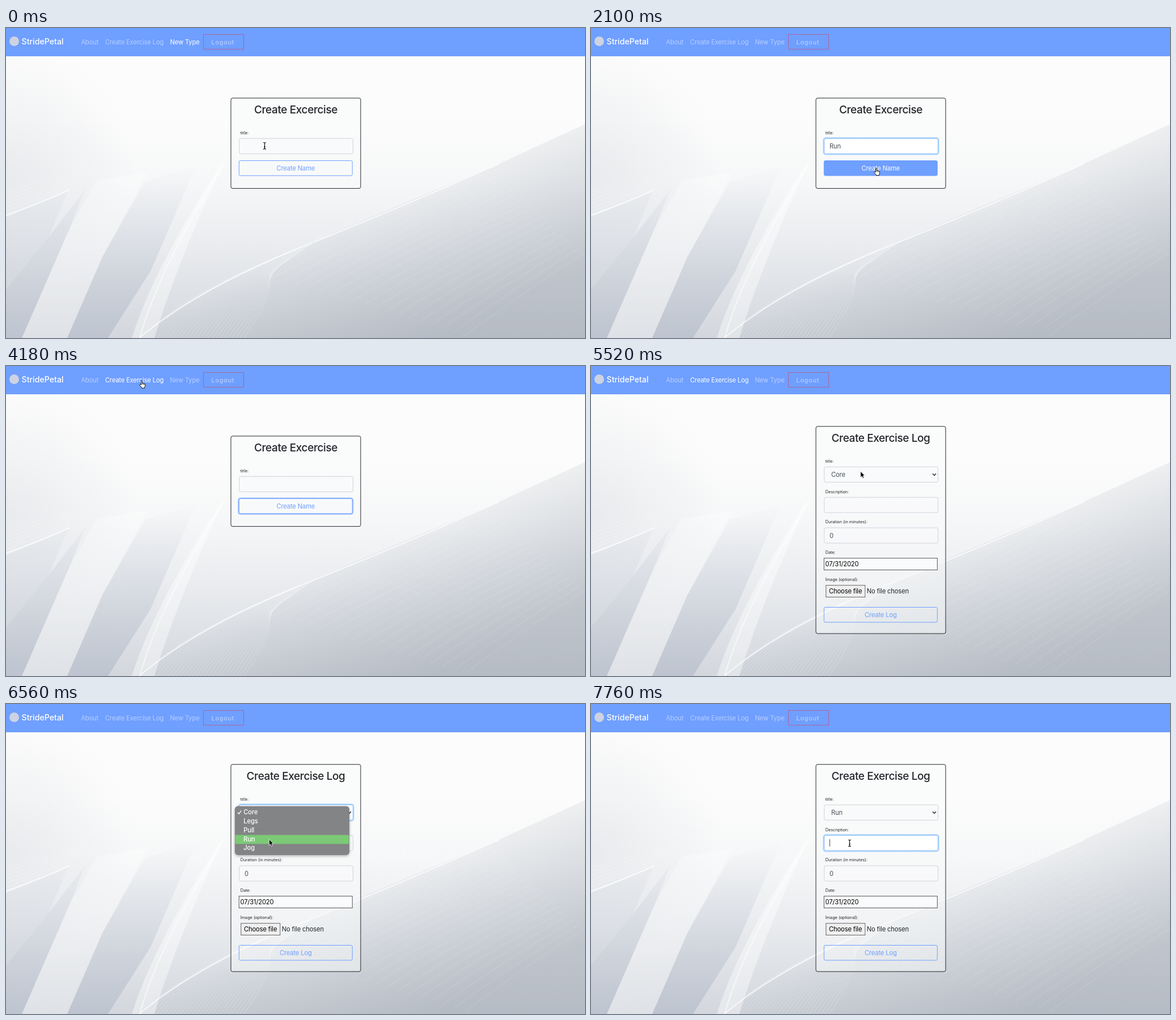
These frames come from a looping animation (1022 px wide and 548 px high, 8000 ms). An HTML page:

```html
<!DOCTYPE html>
<html lang="en">
<head>
<meta charset="utf-8">
<title>Exercise log</title>
<style>
html, body { margin: 0; width: 100%; height: 100%; overflow: hidden; background: #fcfcfc; }
svg { display: block; width: 1022px; height: 548px; }
text { font: 400 11.2px Inter, Roboto, sans-serif; letter-spacing: -.15px; white-space: pre; }
text.title { font-size: 19px; font-weight: 500; letter-spacing: -.4px; }
text.label { font-size: 7.3px; letter-spacing: 0; }
text.brand { font-size: 14.2px; font-weight: 500; letter-spacing: 0; }
text.logout { font-size: 10.8px; font-weight: 500; letter-spacing: .8px; }
text.item { font-weight: 500; }
</style>
</head>
<body>
<svg viewBox="0 0 1022 548">
  <defs>
    <linearGradient id="sky" x2="0" y2="1">
      <stop offset=".3" stop-color="#fcfcfc"/>
      <stop offset=".5" stop-color="#f6f7f8"/>
      <stop offset=".7" stop-color="#eaecef"/>
      <stop offset="1" stop-color="#d3d7dd"/>
    </linearGradient>
    <linearGradient id="shade" gradientUnits="userSpaceOnUse" x1="620" y1="270" x2="760" y2="548">
      <stop offset="0" stop-color="#8c96a2" stop-opacity="0"/>
      <stop offset="1" stop-color="#8c96a2" stop-opacity=".42"/>
    </linearGradient>
    <linearGradient id="band" gradientUnits="userSpaceOnUse" x1="0" y1="240" x2="0" y2="548">
      <stop offset="0" stop-color="#a9b2c2" stop-opacity="0"/>
      <stop offset="1" stop-color="#a9b2c2" stop-opacity=".5"/>
    </linearGradient>
    <radialGradient id="haze" gradientUnits="userSpaceOnUse" cx="0" cy="260" r="230">
      <stop offset="0" stop-color="#dfe2e6" stop-opacity=".6"/>
      <stop offset="1" stop-color="#dfe2e6" stop-opacity="0"/>
    </radialGradient>
    <filter id="shadow" x="-10%" y="-10%" width="120%" height="130%">
      <feDropShadow dx="0" dy="2" stdDeviation="2.5" flood-opacity=".3"/>
    </filter>
  </defs>
  <g id="backdrop"></g>
  <g id="scene"></g>
</svg>
<script>
const BLUE = '#6f9fff', INK = '#212529', GREY = '#495057';
const LOOP = 8000;

const rect = (x, y, w, h, fill, stroke = 'none', extra = '') =>
  `<rect x="${x}" y="${y}" width="${w}" height="${h}" fill="${fill}" stroke="${stroke}" ${extra}/>`;
const text = (x, y, content, fill = INK, cls = '', anchor = 'start') =>
  `<text x="${x}" y="${y}" fill="${fill}" class="${cls}" text-anchor="${anchor}">${content}</text>`;
const path = (d, stroke, width, extra = '') =>
  `<path d="${d}" fill="none" stroke="${stroke}" stroke-width="${width}" ${extra}/>`;
const repeat = (count, make) => Array.from({ length: count }, (_, i) => make(i)).join('');

function backdrop() {
  const white = (d, width, opacity) => path(d, '#fff', width, `opacity="${opacity}"`);
  return rect(0, 0, 1022, 548, 'url(#sky)') +
    rect(0, 50, 240, 450, 'url(#haze)') +
    '<path d="M230 548Q330 470 520 388T870 240L1022 170V548Z" fill="url(#shade)"/>' +
    '<path d="M0 462L75 370 140 285 112 355 28 548H0Z" fill="url(#band)"/>' +
    '<path d="M0 335L110 287 75 370 0 462Z" fill="url(#band)" opacity=".7"/>' +
    '<path d="M108 548L170 405 245 272 335 245 255 430 180 548Z" fill="url(#band)"/>' +
    '<path d="M28 548L112 355 160 270 250 255 170 405 108 548Z" fill="#fff" opacity=".25"/>' +
    '<path d="M222 548Q262 420 390 225Q300 420 262 548Z" fill="#fff" opacity=".4"/>' +
    white('M0 331Q60 310 112 286', 2, .7) +
    white('M236 548Q270 425 385 240', 2, .6) +
    white('M235 548Q340 460 520 388T870 240', 2.2, .7) +
    repeat(7, i => white(`M0 ${331 - i * 7}L${112 + i * 5} ${286 - i * 6}`, .6, .4)) +
    repeat(26, i => white(`M${245 + i * 7} 548Q${300 + i * 7} 470 ${540 - i * 3} ${382 + i * 2}`, .7, .35)) +
    repeat(20, i => white(`M${430 + i * 20} ${430 + i * 6}Q${560 + i * 18} ${360 + i * 6} ${850 + i * 9} ${245 + i * 8}`, .7, .22));
}

function navbar({ link }) {
  const tab = (x, name) => text(x, 28.5, name, link === name ? '#fff' : 'rgba(255,255,255,.5)');
  return rect(0, 0, 1022, 50, BLUE) +
    '<circle cx="14.5" cy="23.5" r="8.5" fill="#cdd3e2"/>' +
    text(27.5, 28.5, 'StridePetal', '#fff', 'brand') +
    tab(132.5, 'About') + tab(175, 'Create Exercise Log') + tab(289.5, 'New Type') +
    rect(348.5, 11.5, 71, 26, 'none', '#a8689f') +
    text(362.5, 28.5, 'Logout', 'rgba(255,255,255,.5)', 'logout');
}

const card = (y, h, title) =>
  rect(397, y, 229, h, 'rgba(250,251,252,.5)', INK, 'rx="3"') +
  text(511.5, y + 27, title, INK, 'title', 'middle');
const label = (y, content) => text(413.7, y + 2.7, content, INK, 'label');

function field(y, content, glow = 0, x = 421) {
  const halo = glow ? rect(410.5, y - 1, 203, 29, 'none', '#007bff', `rx="4" stroke-width="2.4" stroke-opacity="${.27 * glow}"`) : '';
  const focus = glow ? rect(411.7, y, 200.8, 27, '#fff', '#80bdff', `rx="2.5" opacity="${glow}"`) : '';
  return halo + rect(411.7, y, 200.8, 27, 'rgba(250,251,252,.6)', '#ced4da', 'rx="2.5"') + focus +
    text(x, y + 17.6, content, GREY);
}

function button(y, content, fill = 0, glow = 0) {
  const halo = glow ? rect(410.3, y - .8, 202, 28, 'none', BLUE, `rx="3.5" stroke-width="2.2" stroke-opacity="${.6 * glow}"`) : '';
  return halo + rect(411.3, y, 200, 26.5, BLUE, BLUE, `rx="2.5" fill-opacity="${fill}"`) +
    text(511.3, y + 17.1, content, fill > .4 ? '#fff' : BLUE, '', 'middle');
}

const caretBar = (x, y) => x ? rect(x, y, 1, 13, GREY) : '';

const typePage = s => card(123.9, 159.7, 'Create Excercise') +
  label(185, 'title:') + field(195.3, s.text, s.titleGlow) + caretBar(s.caret, 202) +
  button(234.5, 'Create Name', s.fill, s.buttonGlow);

const logPage = s => card(106.8, 366.2, 'Create Exercise Log') +
  label(168, 'title:') + field(178.3, s.choice, s.selectGlow, 424) +
  path('M603 190.3l3 3 3-3', '#343a40', 1.6) +
  label(222, 'Description:') + field(232.2, '', s.textGlow) + caretBar(s.caret, 239) +
  label(275.5, 'Duration (in minutes):') + field(286, '0') +
  label(329.5, 'Date:') + rect(411.3, 339.7, 200, 20.8, '#fafbfc', '#555') + text(413.5, 354.2, '07/31/2020', '#000') +
  label(377.5, 'Image (optional):') + rect(414.8, 387.7, 69, 20.8, '#efefef', '#666') +
  text(449.2, 402.4, 'Choose file', '#000', '', 'middle') + text(486.7, 402.4, 'No file chosen') +
  button(426.5, 'Create Log') + menu(s);

function menu({ menu: opacity, row }) {
  if (!opacity) return '';
  const rowY = i => 184.1 + i * 15.8;
  return `<g opacity="${opacity}">` +
    rect(404.3, 181, 201.4, 85.5, '#808183', '#6c6d6f', 'rx="5" stroke-width=".7" filter="url(#shadow)"') +
    (row < 0 ? '' : rect(404.5, rowY(row), 201, 15.8, '#78c872')) +
    path('M409 191.8l2.2 2.6 3.8-6', '#fff', 1.4) +
    ['Core', 'Legs', 'Pull', 'Run', 'Jog'].map((name, i) => text(419.3, rowY(i) + 11, name, '#fff', 'item')).join('') +
    '</g>';
}

const BEAM = 'M-2.5 -5.8Q0 -5.8 0 -4.3V4.3Q0 5.8 -2.5 5.8M2.5 -5.8Q0 -5.8 0 -4.3M0 4.3Q0 5.8 2.5 5.8M-1.4 1.8H1.4';
const CURSORS = {
  beam: path(BEAM, '#fff', 2.4, 'opacity=".8"') + path(BEAM, '#000', 1.1),
  arrow: '<path d="M0 0V10.6L2.4 8.4 4 12 6 11.2 4.4 7.6H7.6Z" fill="#000" stroke="#fff" stroke-width=".8"/>',
  hand: '<path d="M3 7.5V1.2Q3 0 4 0T5 1.2V4.8Q6 4 7 5Q8 4.5 8.6 5.5Q10 5.1 10 6.8V9Q10 10.5 9 12V13H4V12Q2 10 .5 8.2Q0 7 1 6.6Q2 6.5 3 7.5Z" fill="#fff" stroke="#000" stroke-width=".9"/>' +
    path('M5 4.8V7M7 5V7M8.6 5.5V7', '#000', .7)
};
const pointer = ([kind, x, y]) => `<g transform="translate(${x} ${y})">${CURSORS[kind]}</g>`;

// Each step changes part of the state and keeps the rest.
const STEPS = [
  [0, { page: typePage, link: 'New Type', text: '', choice: 'Core', cursor: ['beam', 456.5, 208.3] }],
  [150, { titleGlow: .6, caret: 421, link: '' }],
  [300, { titleGlow: 1 }],
  [600, { caret: 0 }],
  [1050, { text: 'R', caret: 428 }],
  [1350, { text: 'Ru', caret: 434 }],
  [1650, { text: 'Run', caret: 441 }],
  [1800, { cursor: ['beam', 468, 217] }],
  [1950, { cursor: ['hand', 495, 243], fill: .6 }],
  [2100, { cursor: ['hand', 499.5, 247.5], fill: 1, caret: 0 }],
  [2550, { caret: 441 }],
  [2850, { titleGlow: .4, buttonGlow: .6, caret: 0 }],
  [3000, { titleGlow: 0, buttonGlow: 1 }],
  [3150, { text: '' }],
  [3300, { cursor: ['beam', 478, 212], fill: .3 }],
  [3450, { cursor: ['arrow', 405, 142], fill: 0 }],
  [3600, { cursor: ['arrow', 312, 76] }],
  [3740, { cursor: ['arrow', 262, 40] }],
  [3890, { cursor: ['hand', 239, 28], link: 'Create Exercise Log' }],
  [4030, { cursor: ['hand', 236, 26.5] }],
  [4180, { cursor: ['hand', 235.5, 26] }],
  [4330, { page: logPage }],
  [4780, { cursor: ['hand', 246, 30] }],
  [4930, { cursor: ['arrow', 286, 58] }],
  [5080, { cursor: ['arrow', 352, 106] }],
  [5230, { cursor: ['arrow', 425, 152] }],
  [5370, { cursor: ['arrow', 466, 180] }],
  [5520, { cursor: ['arrow', 475.8, 186.3] }],
  [5670, { link: '', menu: .97, row: 0, selectGlow: 1 }],
  [5970, { cursor: ['arrow', 473, 203], row: 1 }],
  [6120, { cursor: ['arrow', 471, 212.5] }],
  [6270, { cursor: ['arrow', 469, 222], row: 2 }],
  [6410, { cursor: ['arrow', 466, 233], row: 3 }],
  [6560, { cursor: ['arrow', 464.5, 239.3] }],
  [6860, { row: -1 }],
  [7010, { row: 3, menu: .85 }],
  [7160, { menu: .3, choice: 'Run' }],
  [7310, { menu: 0 }],
  [7460, { cursor: ['beam', 458, 246] }],
  [7610, { cursor: ['beam', 456.5, 246], selectGlow: .4, textGlow: .6 }],
  [7760, { selectGlow: 0, textGlow: 1, caret: 421 }]
];
let merged = {};
const STATES = STEPS.map(([time, change]) => (merged = { ...merged, ...change, time }));

const scene = document.getElementById('scene');
document.getElementById('backdrop').innerHTML = backdrop();

let shown;
function draw(now) {
  const state = STATES.findLast(s => s.time <= now % LOOP);
  if (state !== shown) {
    scene.innerHTML = navbar(state) + state.page(state) + pointer(state.cursor);
    shown = state;
  }
}

const start = performance.now();
function tick() {
  draw(performance.now() - start);
  requestAnimationFrame(tick);
}
tick();
</script>
</body>
</html>
```
